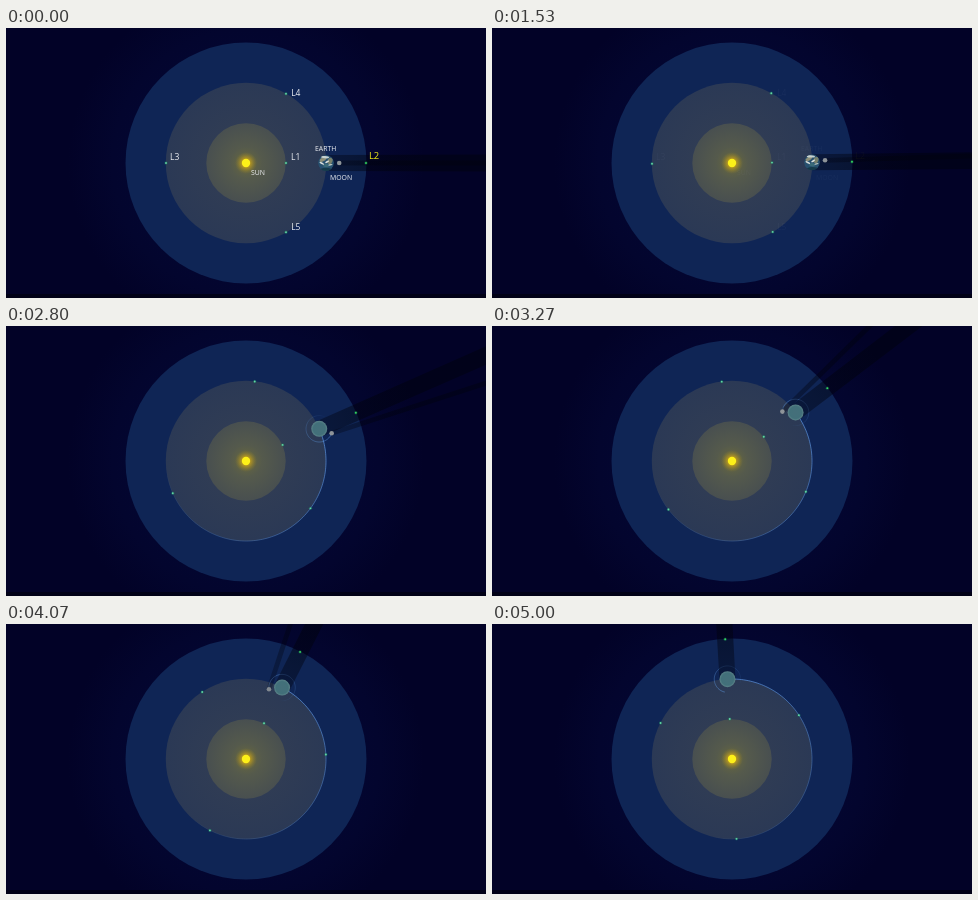
Animation, 480 px wide and 270 px high, one loop 5.07 s. Source, as an HTML page with a canvas:

```html
<!DOCTYPE html>
<html lang="en">
<head>
<meta charset="utf-8">
<title>Lagrange points</title>
<style>
html, body { margin: 0; width: 100%; height: 100%; overflow: hidden; background: #02022a; }
canvas { display: block; width: 480px; height: 270px; }
</style>
</head>
<body>
<canvas id="stage"></canvas>
<script>
const W = 480, H = 270, LOOP = 5.07, CX = 240, CY = 135, RAD = Math.PI / 180;
const ORBIT = 80, MOON_ORBIT = 13.2, MOON_RATIO = 14.35;
const canvas = document.getElementById('stage');
const g = canvas.getContext('2d');
const dpr = window.devicePixelRatio || 1;
canvas.width = W * dpr;
canvas.height = H * dpr;

// Earth's angle over time: seconds, degrees
const keys = [[1.25, 0], [2, 5], [2.8, 23.7], [3.67, 49.9], [4.47, 76.6], [5.07, 95.4]];

// Lagrange points: angle, radius
const points = [[0, 40], [0, 120], [180, 80], [60, 80], [-60, 80]];

const labels = [
  ['L1', 285, 131.5, 8.5], ['L3', 164, 131.5, 8.5], ['L4', 285.2, 67.5, 8.5],
  ['L5', 285.2, 202, 8.5], ['EARTH', 309, 123.4, 6.9], ['MOON', 324, 152, 6.9],
  ['SUN', 245, 147, 6.9], ['L2', 363, 130.8, 9.4, '#f2ec18']
];

const clamp = v => Math.max(0, Math.min(1, v));
function ramp(t, a, b) {
  const u = clamp((t - a) / (b - a));
  return u * u * (3 - 2 * u);
}

function slope(i) {
  if (i === 0) return 0;
  const a = keys[i - 1], b = keys[Math.min(i + 1, keys.length - 1)];
  return (b[1] - a[1]) / (b[0] - a[0]);
}

function earthAngle(t) {
  if (t <= keys[0][0]) return 0;
  let i = 0;
  while (i < keys.length - 2 && t > keys[i + 1][0]) i++;
  const [t0, a] = keys[i], [t1, b] = keys[i + 1];
  const d = t1 - t0, u = (t - t0) / d, u2 = u * u, u3 = u2 * u;
  return a * (2 * u3 - 3 * u2 + 1) + b * (3 * u2 - 2 * u3)
    + d * (slope(i) * (u3 - 2 * u2 + u) + slope(i + 1) * (u3 - u2));
}

function polar(x, y, r, deg) {
  return [x + r * Math.cos(deg * RAD), y - r * Math.sin(deg * RAD)];
}

function disc(x, y, r, fill) {
  g.fillStyle = fill;
  g.beginPath();
  g.arc(x, y, r, 0, 7);
  g.fill();
}

function radial(x, y, r, ...stops) {
  const q = g.createRadialGradient(x, y, 0, x, y, r);
  stops.forEach(([p, c]) => q.addColorStop(p, c));
  return q;
}

function shadow(x, y, half, near, far) {
  g.save();
  g.translate(x, y);
  g.rotate(Math.atan2(y - CY, x - CX));
  const q = g.createLinearGradient(0, 0, 60, 0);
  q.addColorStop(0, `rgba(0,2,14,${near})`);
  q.addColorStop(1, `rgba(0,2,14,${far})`);
  g.fillStyle = q;
  g.beginPath();
  g.moveTo(0, -half);
  g.lineTo(320, -half * 1.1);
  g.lineTo(320, half * 1.1);
  g.lineTo(0, half);
  g.fill();
  g.restore();
}

// Arc that fades out behind a moving body
function trail(x, y, r, head, span, color, alpha, width) {
  if (alpha <= 0) return;
  const n = 60, step = span / n;
  g.strokeStyle = color;
  g.lineWidth = width;
  for (let i = 0; i < n; i++) {
    g.globalAlpha = alpha * (1 - i / n);
    g.beginPath();
    g.arc(x, y, r, (i * step - head) * RAD, ((i + 1) * step - head) * RAD);
    g.stroke();
  }
  g.globalAlpha = 1;
}

function blob(x, y, rx, ry, turn, fill) {
  g.fillStyle = fill;
  g.beginPath();
  g.ellipse(x, y, rx, ry, turn, 0, 7);
  g.fill();
}

function globe(x, y, turn, alpha) {
  if (alpha <= 0) return;
  g.save();
  g.globalAlpha = alpha;
  g.translate(x, y);
  g.rotate(-turn * RAD);
  g.beginPath();
  g.arc(0, 0, 8, 0, 7);
  g.clip();
  disc(0, 0, 8, '#27506f');
  blob(-3, -3.6, 3.6, 1.8, -0.5, '#8d8f78');
  blob(4, -2, 2.4, 3.2, 0.4, '#77806c');
  blob(0, 2.5, 3, 1.7, 0.2, '#3a6a78');
  blob(-1, -5.8, 4.2, 1.1, 0.1, '#c7d2d0');
  blob(-4.2, 0.2, 2.6, 0.9, 0.5, '#d5dcda');
  blob(1.2, -1.2, 2.2, 0.8, -0.5, '#dce2de');
  blob(4.4, 1.8, 2.2, 0.7, -0.2, '#b3c0bd');
  blob(0, 7.4, 6.5, 2.6, 0, '#153a4a');
  g.restore();
}

function backdrop() {
  g.fillStyle = '#020227';
  g.fillRect(0, 0, W, H);
  disc(CX, CY, 178, radial(CX, CY, 178, [0, '#04083a'], [0.75, '#03052e'], [1, '#020227']));
  g.fillStyle = 'rgba(0,0,10,.6)';
  g.fillRect(0, 266, W, 4);
  disc(CX, CY, 120.5, '#0f2555');
  disc(CX, CY, 80.2, radial(CX, CY, 80, [0, '#343f54'], [1, '#2b3955']));
  disc(CX, CY, 39.7, radial(CX, CY, 40, [0, '#6a6a3c'], [0.4, '#555a4c'], [1, '#484f50']));
}

function sun() {
  disc(CX, CY, 11, radial(CX, CY, 11, [0, 'rgba(225,180,20,.9)'], [0.45, 'rgba(205,165,25,.65)'], [1, 'rgba(150,130,40,0)']));
  disc(CX, CY, 4.2, '#fdf019');
}

function draw(t) {
  g.setTransform(dpr, 0, 0, dpr, 0, 0);
  const angle = earthAngle(t);
  const moonAngle = angle * MOON_RATIO;
  const [ex, ey] = polar(CX, CY, ORBIT, angle);
  const [mx, my] = polar(ex, ey, MOON_ORBIT, moonAngle);
  const flat = ramp(t, 2.1, 2.75);
  const moonAlpha = 1 - clamp((t - 3.95) / 1);

  backdrop();
  sun();

  trail(CX, CY, ORBIT, angle, 200, '#5f9cf0', 0.75 * flat, 0.9);
  trail(ex, ey, MOON_ORBIT, moonAngle, 290, '#5c93d8', 0.75 * flat, 0.8);
  shadow(ex, ey, 8, 0.36, 0.52);
  shadow(mx, my, 2.4, 0.3 * moonAlpha, 0.45 * moonAlpha);

  points.forEach(([a, r], i) => {
    const [x, y] = polar(CX, CY, r, a + angle);
    disc(x, y, 1.7, 'rgba(30,150,100,.35)');
    disc(x, y, 0.95, i === 1 ? '#35d95c' : '#62d6a4');
  });

  globe(ex, ey, angle * 3, 1 - flat);
  if (flat > 0) {
    g.globalAlpha = flat;
    disc(ex, ey, 8, radial(ex, ey, 8, [0, '#456f7a'], [0.75, '#42707a'], [1, '#5b8388']));
    g.globalAlpha = 1;
  }
  g.globalAlpha = moonAlpha;
  disc(mx, my, 2.3, '#8e9499');
  g.globalAlpha = 1;

  g.globalAlpha = 1 - ramp(t, 1.05, 1.6);
  for (const [text, x, y, size, color] of labels) {
    g.font = `${size}px "Open Sans", "Noto Sans", sans-serif`;
    g.fillStyle = color || '#eef0f4';
    g.fillText(text, x, y);
  }
  g.globalAlpha = 1;
}

const start = performance.now();
function tick() {
  draw((performance.now() - start) / 1000 % LOOP);
  requestAnimationFrame(tick);
}
tick();
</script>
</body>
</html>
```
